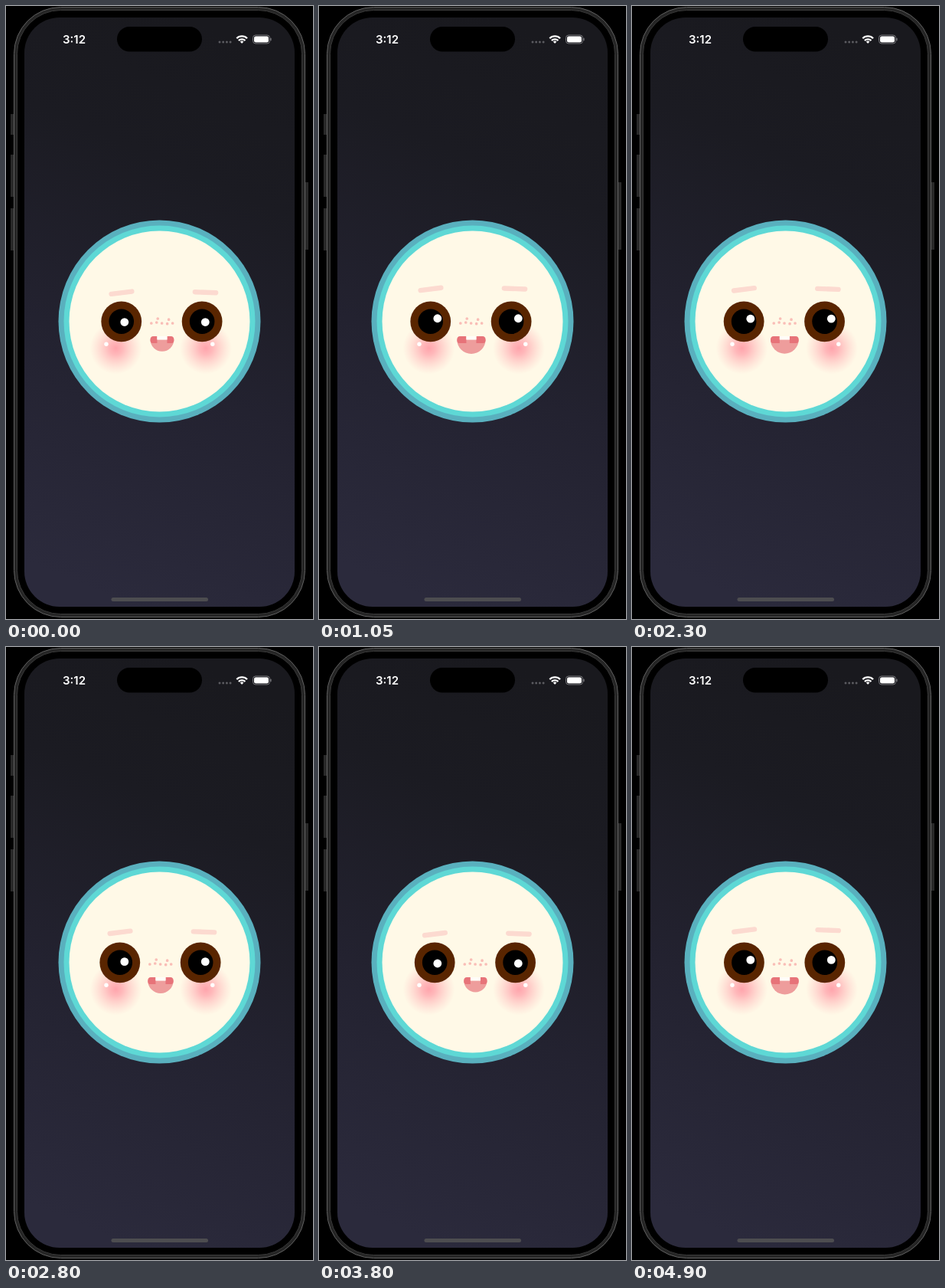
An HTML page for the animation above (4950 ms loop, 401 by 800 pixels).

```html
<!DOCTYPE html>
<html lang="en">
<head>
<meta charset="utf-8">
<title>Blushing face</title>
<style>
  html, body { margin: 0; width: 100%; height: 100%; overflow: hidden; background: #000; }
  svg { display: block; width: 401px; height: 800px; }
</style>
</head>
<body>
<svg viewBox="0 0 401 800">
  <defs>
    <linearGradient id="night" x1=".6" y1="0" x2=".4" y2="1">
      <stop offset="0" stop-color="#19191e"/>
      <stop offset=".25" stop-color="#1b1b22"/>
      <stop offset=".6" stop-color="#232230"/>
      <stop offset="1" stop-color="#2b2a3c"/>
    </linearGradient>
    <radialGradient id="blush">
      <stop offset="0" stop-color="#ffa4ac"/>
      <stop offset=".25" stop-color="#ffacb2" stop-opacity=".85"/>
      <stop offset="1" stop-color="#ffc4c2" stop-opacity="0"/>
    </radialGradient>
    <g id="eye">
      <circle r="26.4" fill="#592500"/>
      <circle r="16.3"/>
    </g>
  </defs>

  <!-- Phone -->
  <path d="M8 141v27M8 194v55M8 264v55M393 230v88" stroke="#292929" stroke-width="4"/>
  <rect x="10.5" y="1.5" width="380" height="796" rx="61" fill="#252525" stroke="#606060"/>
  <rect x="14.5" y="5.5" width="372" height="788" rx="57" stroke="#3a3a3a"/>
  <rect x="24" y="15" width="353" height="769" rx="46" fill="url(#night)"/>
  <rect x="145" y="27" width="111" height="32.5" rx="16.2"/>
  <rect x="137.5" y="772" width="126.500" height="5" rx="2.500" fill="#4d4d50"/>

  <!-- Status bar -->
  <text x="74" y="48.700" font-family="Inter, sans-serif" font-size="15" font-weight="600" fill="#fff">3:12</text>
  <path d="M279 47h15" stroke="#5b5b60" stroke-width="3" stroke-linecap="round" stroke-dasharray="0 4.700"/>
  <g fill="none" stroke="#fff" stroke-width="2.300">
    <path d="M301.300 42.300a9.700 9.700 0 0 1 13.700 0M303.900 45.100a6 6 0 0 1 8.500 0"/>
    <path d="M308.100 49l-2.300-2.400a3.300 3.300 0 0 1 4.600 0z" fill="#fff" stroke="none"/>
  </g>
  <rect x="322.500" y="38" width="22" height="11" rx="3.500" fill="none" stroke="#77777b"/>
  <rect x="324" y="39.500" width="19" height="8" rx="2.300" fill="#fff"/>
  <path d="M346 41.800v3.400" stroke="#77777b" stroke-width="1.300"/>

  <!-- Face -->
  <g transform="translate(200.500 411.500)">
    <circle r="132" fill="#59b0be"/>
    <circle r="125" fill="#5ed8d5"/>
    <circle r="118" fill="#fff9e7"/>
  </g>
  <circle cx="143.500" cy="446.500" r="34" fill="url(#blush)"/>
  <circle cx="261" cy="446.500" r="34" fill="url(#blush)"/>
  <g fill="#fff">
    <circle cx="131" cy="441.300" r="2.700"/>
    <circle cx="269.800" cy="441.300" r="2.700"/>
  </g>
  <g id="brows" fill="none" stroke="#fcdad0" stroke-width="6.400" stroke-linecap="round">
    <path d="M131.300 369.800l26.700-3.300M240.500 367.200l27.300 1"/>
  </g>
  <g id="features">
    <use href="#eye" x="144.400" y="411.800"/>
    <use href="#eye" x="249.800" y="411.800"/>
    <path d="M183.500 414h0M191.900 408h0M190.400 413h0M197.300 414h0M206.300 409.200h0M204.300 414.700h0M211.300 414h0"
          stroke="#f9bdb6" stroke-width="3.700" stroke-linecap="round"/>
    <g transform="translate(197.600 431)">
      <path id="mouth" fill="#ee9d9c"/>
      <path id="corners" fill="#e77379"/>
      <path d="M-6.500 0h13v4.500h-13z" fill="#fffdf8"/>
    </g>
  </g>
  <g id="glints" fill="#fff">
    <circle cx="154.800" cy="406.500" r="5.400"/>
    <circle cx="260.300" cy="406.500" r="5.400"/>
  </g>
</svg>
<script>
  const LOOP = 4950, SWING = 4000, TURN = 1630;
  const DX = 6.9, DY = 6.6;
  const [brows, features, glints, mouth, corners] =
    ['brows', 'features', 'glints', 'mouth', 'corners'].map(id => document.getElementById(id));
  const move = (el, x, y) => el.setAttribute('transform', `translate(${x} ${y})`);

  // One half of the upper lip; side is -1 for left, 1 for right.
  const corner = (r, side) =>
    `M${side * 6.5} 0H${side * (r - 4)}Q${side * r} 0 ${side * r} 4.5Q${side * r} 9 ${side * (r - 3)} 9H${side * 6.5}Z`;

  function draw(now) {
    const t = now % LOOP;
    const p = (1 - Math.cos((t - TURN) / SWING * 2 * Math.PI)) / 2;
    const r = 19.5 - 4.4 * p;
    move(brows, DX * p, DY * p);
    move(features, DX * p, 0);
    move(glints, 0, DY * p);
    mouth.setAttribute('d', `M${-r} 4.300H${r}A${r} ${r} 0 0 1 ${-r} 4.300Z`);
    corners.setAttribute('d', corner(r, -1) + corner(r, 1));
  }

  const start = performance.now();
  function tick() {
    draw(performance.now() - start);
    requestAnimationFrame(tick);
  }
  tick();
</script>
</body>
</html>
```
